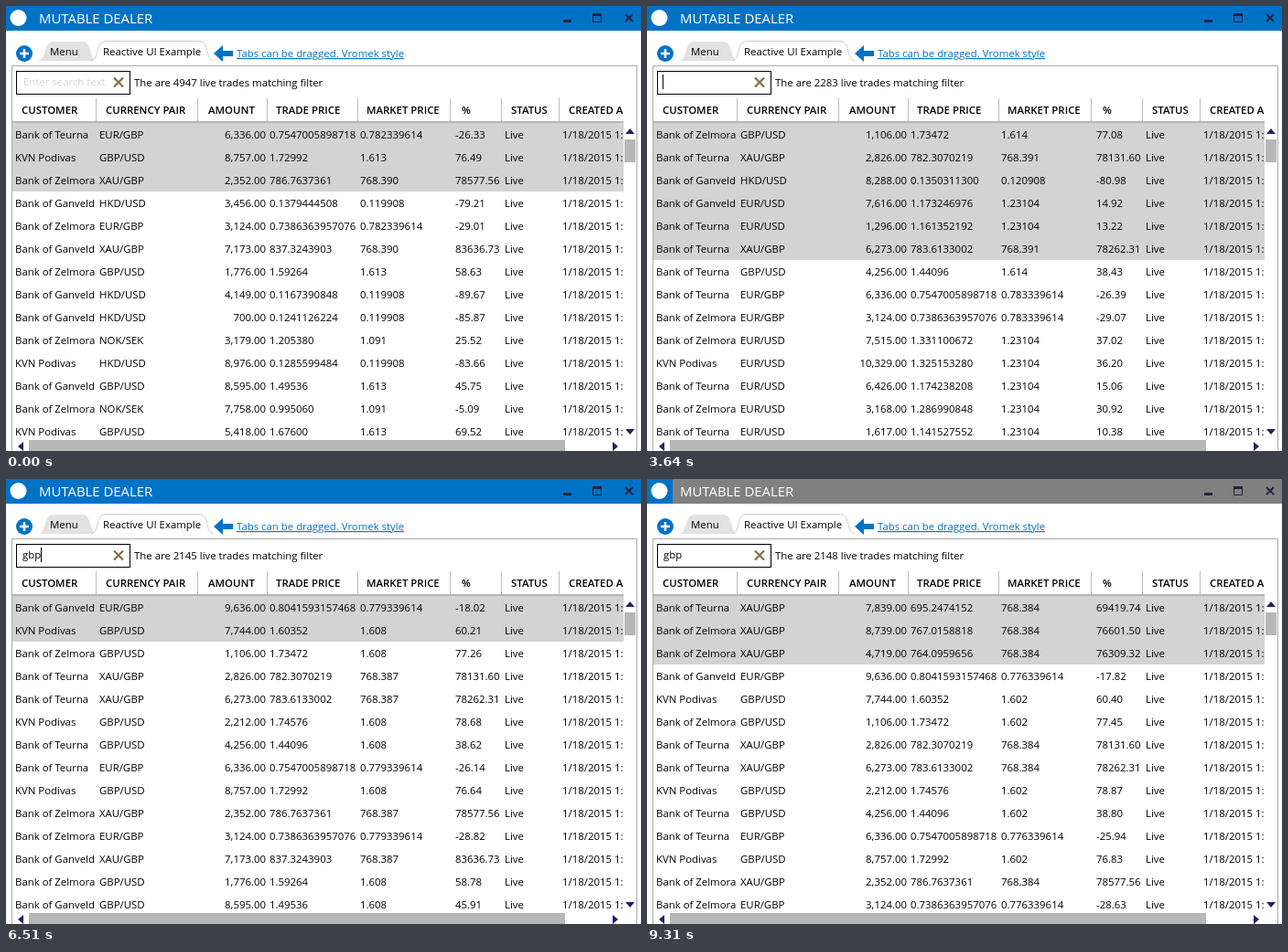
An HTML page that plays this animation: 694x487 px, repeating every 9380 ms.

```html
<!DOCTYPE html>
<html lang="en">
<head>
<meta charset="utf-8">
<title>Live trades</title>
<style>
  html, body { margin: 0; width: 100%; height: 100%; overflow: hidden; background: #fff; }
  svg { display: block; }
  text { font: 11.4px "Open Sans", "Noto Sans", sans-serif; fill: #000; white-space: pre; }
  .title { font-size: 14.9px; fill: #fff; }
  .head { font-weight: 600; }
  .link { fill: #0072c6; text-decoration: underline; }
  .hint { fill: #d6d6d6; }
  .end { text-anchor: end; }
</style>
</head>
<body>
<svg id="stage" width="694" height="487">
  <rect id="bar" width="694" height="27"/>
  <rect width="28" height="27" fill="#0072c6"/>
  <circle cx="13.5" cy="13" r="9" fill="#fff"/>
  <text class="title" x="36" y="19">MUTABLE DEALER</text>
  <g fill="none" stroke="#23233f">
    <path d="M609 16.5h9" stroke-width="3"/>
    <path d="M641.5 9v8.500h9V9" />
    <path d="M641 9.500h10" stroke-width="3"/>
    <path d="M677 9l8 8m0-8l-8 8" stroke-width="2"/>
  </g>

  <circle cx="20" cy="52" r="9" fill="#0072c6"/>
  <path d="M15 52h10M20 47v10" stroke="#fff" stroke-width="2.500"/>
  <path d="M35 60C44 60 41 39 51 39H84C94 39 91 60 100 60Z" fill="#e2e2e2"/>
  <path d="M93 60C102 60 98 38.500 108 38.500H212C222 38.500 218 60 227 60" fill="#fff" stroke="#cfcfcf"/>
  <text x="48" y="54">Menu</text>
  <text x="106" y="54">Reactive UI Example</text>
  <path d="M227 52l10-9v6h11v6h-11v6z" fill="#0072c6"/>
  <text class="link" x="252" y="56">Tabs can be dragged. Vromek style</text>

  <path d="M6.500 487V65.500H689.500V487" fill="none" stroke="#ababab"/>
  <rect x="11.500" y="71.500" width="124" height="25" fill="#fff" stroke="#000"/>
  <text id="hint" class="hint" x="19" y="87">Enter search text</text>
  <text id="typed" x="18" y="87"></text>
  <rect id="caret" y="75" width="1" height="16"/>
  <path d="M118 78.500l10 10m0-10l-10 10" stroke="#85714d" stroke-width="2.300"/>
  <text id="label" x="140" y="88"></text>

  <svg id="grid" width="675" height="474"></svg>

  <rect x="25" y="475" width="586" height="12" fill="#b7b7b7"/>
  <rect x="676" y="146" width="12" height="25" fill="#b7b7b7"/>
  <path d="M677 140l5-6 5 6zM677 463h10l-5 6zM19 477v10l-6-5zM663 477v10l6-5z" fill="#26215f"/>
  <path id="mouse" d="M0 0v15.500l3.600-3.300 2.800 6 2.500-1.200-2.800-5.700h5z" fill="#fff" stroke="#000"/>
</svg>
<script>
const LOOP = 9380, STEP = 70, VISIBLE = 14;

const customers = { T: 'Bank of Teurna', K: 'KVN Podivas', Z: 'Bank of Zelmora', G: 'Bank of Ganveld' };

// pair: [opening market price, decimals]
const markets = {
  'EUR/GBP': [0.782339614, 9], 'GBP/USD': [1.613, 3], 'XAU/GBP': [768.39, 3],
  'HKD/USD': [0.119908, 6], 'NOK/SEK': [1.091, 3], 'EUR/USD': [1.23004, 5]
};

// Newest first: customer, pair, amount, trade price
const trades = `
T XAU/GBP 7,839 695.2474152
Z XAU/GBP 8,739 767.0158818
Z XAU/GBP 4,719 764.0959656
G EUR/GBP 9,636 0.8041593157468
K GBP/USD 7,744 1.60352
Z GBP/USD 1,106 1.73472
T XAU/GBP 2,826 782.3070219
G HKD/USD 8,288 0.1350311300
G EUR/USD 7,616 1.173246976
T EUR/USD 1,296 1.161352192
T XAU/GBP 6,273 783.6133002
K GBP/USD 2,212 1.74576
T GBP/USD 4,256 1.44096
T EUR/GBP 6,336 0.7547005898718
K GBP/USD 8,757 1.72992
Z XAU/GBP 2,352 786.7637361
G HKD/USD 3,456 0.1379444508
Z EUR/GBP 3,124 0.7386363957076
G XAU/GBP 7,173 837.3243903
Z GBP/USD 1,776 1.59264
G HKD/USD 4,149 0.1167390848
G HKD/USD 700 0.1241126224
Z NOK/SEK 3,179 1.205380
K HKD/USD 8,976 0.1285599484
G GBP/USD 8,595 1.49536
Z NOK/SEK 7,758 0.995060
K GBP/USD 5,418 1.67600
Z EUR/USD 7,515 1.331100672
K EUR/USD 10,329 1.325153280
T EUR/USD 6,426 1.174238208
Z EUR/USD 3,168 1.286990848
T EUR/USD 1,617 1.141527552
T HKD/USD 3,303 0.1411413692
T EUR/USD 1,341 1.232473088
K EUR/GBP 154 0.7591320917102
G EUR/GBP 180 0.7334926882166
T NOK/SEK 9,735 1.153350
T NOK/SEK 11,438 1.028940
T EUR/USD 2,547 1.203774208`.trim().split('\n').map((line, index) => {
  const [who, pair, amount, price] = line.split(' ');
  const customer = customers[who];
  return { index, customer, pair, amount, price, key: (customer + ' ' + pair).toLowerCase() };
});

// time, newest trade, filter, filter for fresh trades, total, highlighted rows
const lists = [
  [0, 13, '', '', 4947, 3], [420, 13, '', '', 4947, 0],
  [1680, 13, 'eur', 'eur', 2276, 0], [1750, 12, 'eur', 'eur', 2277, 1],
  [2940, 12, 'eur', 'eur', 2277, 0], [3290, 5, 'eur', 'e', 2283, 6],
  [3850, 5, '', '', 4955, 7], [4690, 5, '', '', 4955, 0],
  [5460, 5, 'g', 'g', 2868, 0], [5880, 5, 'gbp', 'gbp', 2143, 0],
  [6160, 3, 'gbp', 'gbp', 2145, 2], [7910, 3, 'gbp', 'gbp', 2145, 0],
  [9030, 0, 'gbp', 'gbp', 2148, 3]
];
// time, drift of all pairs, drift of GBP/USD, both in thousandths
const ticks = [
  [0, 0, 0], [280, 2, -2], [1120, 4, -5], [2100, 3, -2], [3080, 1, 1], [4060, -1, -2],
  [4970, -3, -4], [5950, -4, -3], [6510, -3, -5], [7420, -2, -6], [8330, -4, -9], [9240, -6, -11]
];
const typing = [
  [0, ''], [1120, 'e'], [1330, 'eu'], [1540, 'eur'], [3220, 'eu'], [3430, 'e'], [3570, ''],
  [4620, 'g'], [4830, 'gb'], [5040, 'gbp']
];
const blinks = [
  [0, 0], [280, 1], [770, 0], [1120, 1], [2100, 0], [2660, 1], [3150, 0], [3220, 1], [4060, 0], [4550, 1],
  [5600, 0], [6090, 1], [6580, 0], [7140, 1], [7630, 0], [8050, 1], [8540, 0], [9030, 1], [9310, 0]
];
const caretX = { '': 17, e: 24, eu: 30, eur: 34, g: 25, gb: 31, gbp: 38 };
// time, x, y, hovered row
const pointer = [[0], [7490, 499, 392, 9], [7560, 496, 415, 10], [7630, 494, 438, 11], [7700]];

const $ = id => document.getElementById(id);
const at = (table, t) => table.findLast(entry => entry[0] <= t);

function add(parent, tag, attrs, content = '') {
  const node = document.createElementNS('http://www.w3.org/2000/svg', tag);
  for (const name in attrs) node.setAttribute(name, attrs[name]);
  node.textContent = content;
  return parent.appendChild(node);
}

const grid = $('grid');
const heads = {
  'CUSTOMER': 17, 'CURRENCY PAIR': 109, 'AMOUNT': 221, 'TRADE PRICE': 295,
  'MARKET PRICE': 394, '%': 498, 'STATUS': 552, 'CREATED A': 615
};
for (const name in heads) add(grid, 'text', { class: 'head', x: heads[name], y: 118 }, name);
for (const x of [98, 209, 285, 384, 485, 541, 604])
  add(grid, 'rect', { x, y: 101, width: 1, height: 25, fill: '#bdbdbd' });
add(grid, 'rect', { x: 7, y: 126, width: 668, height: 2, fill: '#b5b5b5' });

const columns = [10, 102, 284, 288, 387, 491, 545, 608];
const rows = Array.from({ length: VISIBLE }, (_, i) => ({
  back: add(grid, 'rect', { x: 7, y: 128 + 25 * i, width: 668, height: 25 }),
  cells: columns.map((x, c) => add(grid, 'text', { x, y: 145 + 25 * i, class: c === 2 ? 'end' : '' }))
}));

function cellsOf(trade, drift, poundDrift) {
  const [open, digits] = markets[trade.pair];
  const market = open + (trade.pair === 'GBP/USD' ? poundDrift : drift) / 1000;
  const price = +trade.price;
  const percent = 100 * (price - 2 * market / (market + price));
  return [trade.customer, trade.pair, trade.amount + '.00', trade.price,
    market.toFixed(digits), percent.toFixed(2), 'Live', '1/18/2015 1:09'];
}

function draw(t) {
  const [, newest, query, freshQuery, total, lit] = at(lists, t);
  const [, drift, poundDrift] = at(ticks, t);
  const [, mouseX, mouseY, hovered] = at(pointer, t);
  const text = at(typing, t)[1];

  const shown = trades.filter(({ index, key }) =>
    index >= newest && key.includes(index < 12 ? freshQuery : query));
  rows.forEach(({ back, cells }, i) => {
    back.setAttribute('fill', i === hovered ? '#a0d8f1' : i < lit ? '#d3d3d3' : '#fff');
    const values = shown[i] ? cellsOf(shown[i], drift, poundDrift) : [];
    cells.forEach((cell, c) => { cell.textContent = values[c] ?? ''; });
  });

  $('label').textContent = `The are ${total} live trades matching filter`;
  $('typed').textContent = text;
  $('hint').style.display = t < 280 ? '' : 'none';
  $('caret').setAttribute('x', caretX[text]);
  $('caret').style.display = at(blinks, t)[1] ? '' : 'none';
  $('bar').setAttribute('fill', t < 9310 ? '#0072c6' : '#808080');
  $('mouse').style.display = mouseX ? '' : 'none';
  if (mouseX) $('mouse').setAttribute('transform', `translate(${mouseX} ${mouseY})`);
}

const start = performance.now();
let last = -1;
function play() {
  const step = Math.floor((performance.now() - start) % LOOP / STEP);
  if (step !== last) draw((last = step) * STEP);
  requestAnimationFrame(play);
}
play();
</script>
</body>
</html>
```
